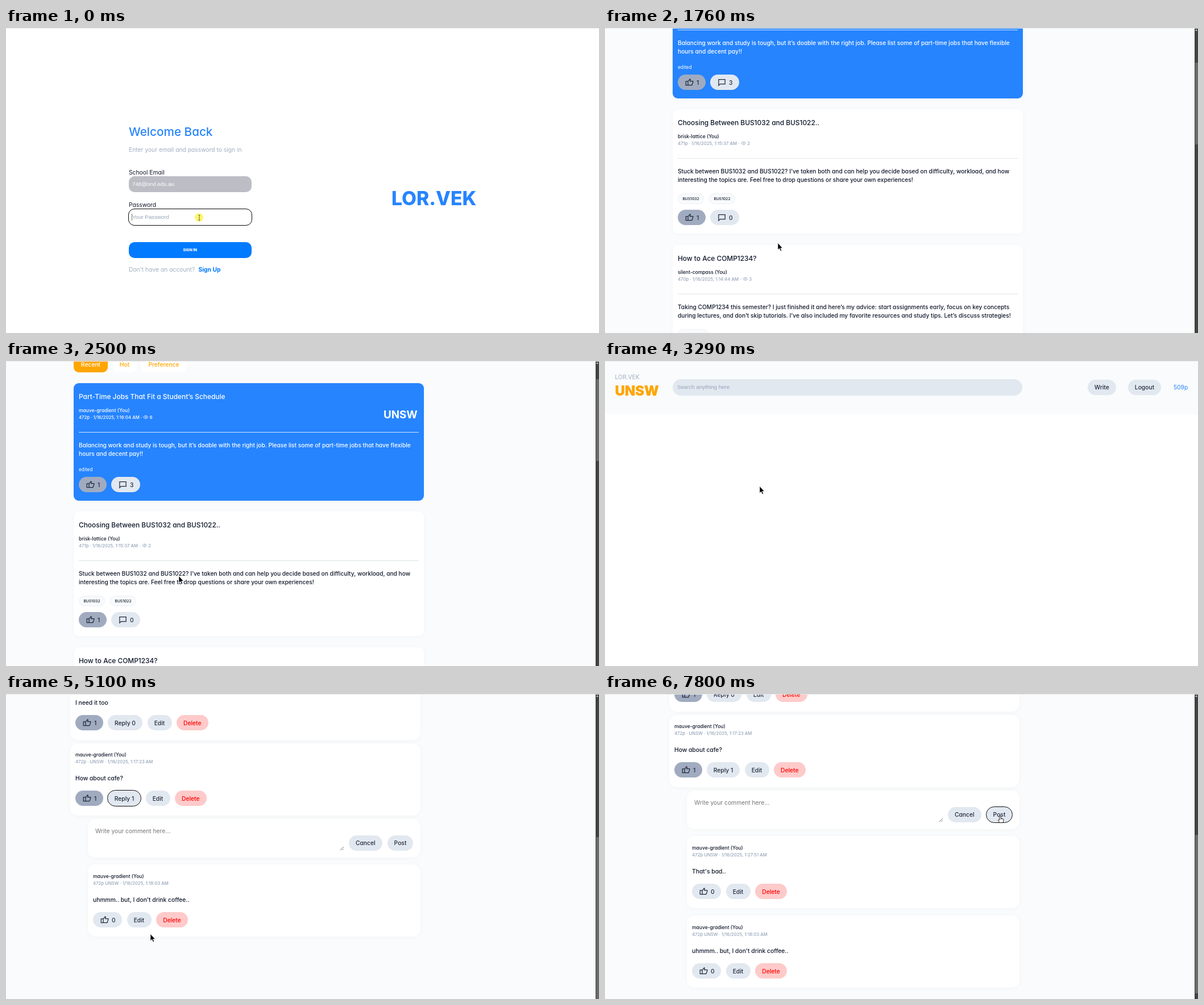
Animation of 1043x537 px, one loop 7.86 s. Source, as an HTML page:

```html
<!DOCTYPE html>
<html lang="en">
<head>
<meta charset="utf-8">
<title>Student forum</title>
<style>
html, body { margin: 0; width: 100%; height: 100%; overflow: hidden; background: #fff; }
#stage { position: relative; width: 1043px; height: 537px; overflow: hidden; background: #fff;
  font: 400 10.3px/16px Inter, "Open Sans", sans-serif; font-feature-settings: "cv11"; color: #0f172a; }
#stage div, #stage span.t, #stage svg.abs { position: absolute; box-sizing: border-box; }
[hidden] { display: none !important; }
.scene { inset: 0; overflow: hidden; background: #fafbfc; }
#login, #blank { background: #fff; }
.scroll { left: 0; top: 0; width: 1037px; }
.t { white-space: pre; }
.m { font-weight: 500; }
.b { font-weight: 700; }
.title { font-size: 11.9px; font-weight: 500; }
.user { font-size: 8.5px; font-weight: 500; }
.meta { font-size: 7.75px; font-weight: 500; color: #94a3b8; }
.note { font-size: 8.3px; color: #94a3b8; }
.para { font-size: 10.2px; font-weight: 500; line-height: 15px; }
.grey { color: #a0aec0; }
.hint { color: #757575; }
.blue { color: #2684ff; }
.link { color: #007aff; }
.input { font: 9.7px/16px "Liberation Sans", Arial, sans-serif; color: #94a3b8; }
.welcome { font-size: 20.7px; font-weight: 500; }
.brand { font-size: 33.6px; font-weight: 800; }
.school { font-size: 24.2px; font-weight: 900; letter-spacing: -.3px; color: #ffa500; }
.badge { font-size: 18.8px; font-weight: 700; }
.top { background: #f9fbfc; }
.email { border-radius: 10px; background: #bdbdc5; }
.email .input { color: #fff; }
.password { border: 1.7px solid #0a0a0a; border-radius: 11px; }
.pill { display: flex; align-items: center; justify-content: center; border-radius: 16px;
  background: #e2e8f0; color: #1e293b; font-weight: 500; white-space: pre; }
.submit { border-radius: 10px; background: #007aff; color: #fff; font-size: 6.6px; font-weight: 800; }
.liked { background: #a0abc0; }
.danger { background: #fecaca; color: #f00; }
.tab { border-radius: 9px; background: #fff; color: #ffa500; }
.tab.on { background: #ffa500; color: #fff; }
.tag { font-size: 6.7px; background: #f8fafc; border: 1px solid #edf1f5; color: #0f172a; }
.ring { outline: 1.4px solid #0c0c0c; }
.card { background: #fff; border-radius: 9px; box-shadow: 0 1px 8px rgba(15, 23, 42, .03); }
.round { border-radius: 14px; }
.rule { background: #dfe4ea; }
.hot { background: #2684ff; color: #fff; }
.hot .meta, .hot .note { color: #fff; }
.hot .rule { background: #d4e6ff; }
svg { fill: none; stroke: currentColor; }
#bar { left: 1037px; top: 0; width: 6px; height: 537px; background: #424242; }
#thumb { left: 1px; width: 5px; background: #6a6a6a; }
#arrowUp { left: 1px; top: 2px; border: 2.5px solid transparent; border-top: 0; border-bottom: 3px solid #c8c8c8; }
#topLine { left: 0; top: 0; width: 1043px; height: 1px; background: #e9eaec; }
#glow { border-radius: 50%; background: #fdf66c; }
#caret { background: #777; }
#cursor { left: 0; top: 0; width: 0; height: 0; }
#cursor svg { position: absolute; overflow: visible; }
</style>
</head>
<body>
<div id="stage">
  <div class="scene" id="login"></div>
  <div class="scene" id="blank"></div>
  <div class="scene" id="feed"></div>
  <div class="scene" id="detail"></div>
  <div id="bar"><div id="thumb"></div><div id="arrowUp"></div></div>
  <div id="topLine"></div>
  <div id="cursor">
    <svg id="beam" width="1" height="1"><path d="M-1.5-4.5H1.5M0-4.5V4.5M-1.5 4.5H1.5" stroke="#555" stroke-width=".9"/></svg>
    <svg id="arrow" width="1" height="1"><path d="M0-.5V11.6L2.7 9.1 4.7 13.6 6.6 12.8 4.6 8.4H8.2Z" fill="#000" stroke="#fff" stroke-width=".6"/></svg>
    <svg id="hand" width="1" height="1"><path d="M-1.2 1Q0-.8 1.2 1V5L5.2 5.8Q6.3 6.2 6 8L5.2 12.6H-.8L-3.6 8.4Q-3.6 6.8-1.2 8Z" fill="#fff" stroke="#111" stroke-width=".9"/><path d="M1.2 5V7M3.2 5.5V7.2" stroke="#111" stroke-width=".6"/></svg>
  </div>
</div>
<script>
const LOOP = 7860, VIEW = 600, TRACK = 584, BRAND = 'LOR.VEK', ME = 'mauve-gradient';
const $ = id => document.getElementById(id);

const shapes = {
  like: 'M8 20V9.5L13.6 3l1.3 1.3L13.7 9H22v3l-3 8zM2 9.5h6V20H2z',
  chat: 'M3 21V4h18v13H7z',
  pencil: 'M4 20v-4L16 4l4 4L8 20z',
  bin: 'M4 6.5h16M9 4h6M6 6.5V21h12V6.5M10 10v8M14 10v8',
  eye: 'M1.5 12C6 3.5 18 3.5 22.5 12 18 20.5 6 20.5 1.5 12zM12 8.5a3.5 3.5 0 1 0 .01 0z'
};
const icon = (name, size, style) =>
  `<svg viewBox="0 0 24 24" width="${size}" height="${size}" stroke-width="2" style="${style}"><path d="${shapes[name]}"/></svg>`;
const box = (x, y, w, h, cls, inner = '', id = '') =>
  `<div ${id && `id="${id}"`} class="${cls}" style="left:${x}px;top:${y}px;width:${w}px;height:${h}px">${inner}</div>`;
// y is the middle of the first line
const text = (x, y, s, cls = '', id = '') =>
  `<span ${id && `id="${id}"`} class="t ${cls}" style="left:${x}px;top:${y - 8}px">${s}</span>`;
const pill = (x, y, w, label, cls = '', h = 27.3, id = '') => box(x, y, w, h, 'pill ' + cls, label, id);
const iconPill = (x, y, w, name, label, cls = '') =>
  pill(x, y, w, icon(name, 15, 'position:absolute;left:12.5px;top:6px') + text(33, 13.5, label), cls);
const grip = (x, y) =>
  `<svg class="abs" style="left:${x}px;top:${y}px" width="6" height="6"><path d="M0 6L6 0M3.5 6L6 3.5" stroke="#555" stroke-width=".8"/></svg>`;

function header(wide) {
  const dy = wide ? 1 : 0;
  const [search, write, logout, points] = wide ? [118.5, 848.5, 920, 1000] : [116.5, 843, 913, 990];
  return text(17.5, 26.5 + dy, BRAND, 'grey') + text(17.5, 52 + dy, 'UNSW', 'school') +
    box(search, 31 + dy, 615.5, 28.5, 'pill', text(8.5, 14.3, 'Search anything here', 'input')) +
    pill(write, 31.5 + dy, 50.5, 'Write') + pill(logout, 31.5 + dy, 58, 'Logout') +
    text(points, 45 + dy, '509p', 'blue');
}

function post(x, y, p) {
  return box(x, y, 615.5, p.buttons + 42, 'card ' + (p.cls || ''),
    text(9, 23.5, p.title, 'title') + text(9, 47.5, p.user + ' (You)', 'user') +
    text(9, 59.5, `${p.meta} · ${icon('eye', 9.5, 'vertical-align:-2px')} ${p.views}`, 'meta') +
    (p.logo ? text(545, 56, 'UNSW', 'badge') : '') +
    box(9, 86, 598, 1, 'rule') +
    text(9, 110, p.body, 'para') +
    (p.tags || []).map((s, i) => box(9 + i * 55, 148, s.length > 7 ? 54 : 46, 19, 'pill tag', s)).join('') +
    (p.edited ? text(9, p.buttons - 13, 'edited', 'note') : '') +
    iconPill(9, p.buttons, 48.5, 'like', 1, 'liked') +
    iconPill(66, p.buttons, 50.5, 'chat', p.chats) + (p.extra || ''));
}

function comment(x, y, w, meta, body, buttons, id = '') {
  return box(x, y, w, 127, 'card round',
    text(9, 20.5, ME + ' (You)', 'user') + text(9, 32.5, meta, 'meta') + text(9, 61.5, body, 'm') + buttons, id);
}
const reply = (y, clock, body, id) => comment(144, y, 585, `472p UNSW · 1/16/2025, ${clock} AM`, body,
  iconPill(9, 84, 51, 'like', 0) + pill(68.5, 84, 43, 'Edit') + pill(120, 84, 56, 'Delete', 'danger'), id);

$('login').innerHTML =
  text(216, 182.5, 'Welcome Back', 'welcome blue') +
  text(216, 214, 'Enter your email and password to sign in', 'grey') +
  text(216, 253.5, 'School Email') +
  box(216, 261, 215.5, 27.5, 'email', text(6, 14, '748@orvl.edu.au', 'input')) +
  text(216, 311, 'Password') +
  box(215, 317.5, 217.5, 30, 'password') +
  box(332, 326, 15, 15, '', '', 'glow') +
  text(222, 332.5, 'Your Password', 'input', 'placeholder') + text(223, 332.5, '', 'input', 'dots') +
  box(221, 326.5, 1, 12, '', '', 'caret') +
  pill(216, 377, 215.5, 'SIGN IN', 'submit', 28) +
  text(216, 424.5, 'Don\'t have an account?', 'grey') + text(338.5, 424.5, 'Sign Up', 'b link') +
  text(678, 300, BRAND, 'brand blue');

$('blank').innerHTML = box(0, 0, 1043, 93.5, 'top') + header(true);

const jobs = {
  title: 'Part-Time Jobs That Fit a Student’s Schedule', user: ME,
  meta: '472p · 1/16/2025, 1:16:04 AM', views: 6, chats: 3, buttons: 165, edited: true,
  body: 'Balancing work and study is tough, but it’s doable with the right job. Please list some of part-time jobs that have flexible\nhours and decent pay!!'
};
$('feed').innerHTML = '<div class="scroll" id="feedBody">' + header() +
  pill(119, 92.5, 60, 'Recent', 'tab on') + pill(187.5, 92.5, 42, 'Hot', 'tab') + pill(238, 92.5, 79, 'Preference', 'tab') +
  post(119, 139, { ...jobs, cls: 'hot', logo: true }) +
  post(119, 365, {
    title: 'Choosing Between BUS1032 and BUS1022..', user: 'brisk-lattice', meta: '471p · 1/16/2025, 1:15:37 AM',
    views: 2, chats: 0, buttons: 177, tags: ['BUS1032', 'BUS1022'],
    body: 'Stuck between BUS1032 and BUS1022? I’ve taken both and can help you decide based on difficulty, workload, and how\ninteresting the topics are. Feel free to drop questions or share your own experiences!'
  }) +
  post(119, 604, {
    title: 'How to Ace COMP1234?', user: 'silent-compass', meta: '470p · 1/16/2025, 1:14:44 AM',
    views: 3, chats: 0, buttons: 194, tags: ['COMP1234'], edited: true,
    body: 'Taking COMP1234 this semester? I just finished it and here’s my advice: start assignments early, focus on key concepts\nduring lectures, and don’t skip tutorials. I’ve also included my favorite resources and study tips. Let’s discuss strategies!'
  }) +
  post(119, 860, {
    title: 'Dealing with Burnout: My Experience and Tips', user: 'hollow-trapezoid', meta: '469p · 1/16/2025, 1:13:38 AM',
    views: 1, chats: 0, buttons: 165, body: ''
  }) + '</div>';

const ownButtons = (n, w, id) => iconPill(9, 83.5, 48.5, 'like', 1, 'liked') +
  pill(66, 83.5, w, 'Reply ' + n, '', 27.3, id) + pill(74.5 + w, 83.5, 43, 'Edit') + pill(126 + w, 83.5, 55.5, 'Delete', 'danger');
$('detail').innerHTML = '<div class="scroll" id="detailBody">' + header() +
  post(113, 94, {
    ...jobs,
    extra: iconPill(458, 165, 63.5, 'pencil', 'edit') + iconPill(530, 165, 76.5, 'bin', 'delete', 'danger')
  }) +
  box(113, 326, 616, 69, 'card round', text(13.5, 21.5, 'What do you think?', 'hint') + grip(512, 50) + pill(543, 25.5, 60, 'Submit', '', 31)) +
  comment(113, 419.5, 616, '472p · UNSW · 1/16/2025, 1:17:38 AM', 'I need it too', ownButtons(0, 61, 'reply0')) +
  comment(113, 552.5, 616, '472p · UNSW · 1/16/2025, 1:17:23 AM', 'How about cafe?', ownButtons(1, 58, 'reply1')) +
  '<div id="thread" style="left:0;top:0">' +
  box(144, 686, 585, 67.5, 'card round', text(13, 20.5, '', 'hint', 'draft') + grip(444, 49) +
    pill(458.5, 28.5, 59.5, 'Cancel') + pill(527, 28.5, 45, 'Post', '', 27.3, 'postBtn')) +
  reply(766, '1:27:51', 'That\'s bad..', 'fresh') + reply(766, '1:18:03', 'uhmmm.. but, I don\'t drink coffee..', 'older') +
  '</div></div>';

// Each key is [time, ...values], joined by straight lines.
const feedScroll = [[1450, 0], [1940, 350], [2120, 395], [2329, 395], [2330, 260], [2499, 260], [2500, 100], [2699, 100], [2700, 0]];
const detailScroll = [[3450, 0], [3870, 150], [3910, 158], [4250, 290], [4880, 290], [5100, 466], [5350, 516]];
const path = [[560, 340, 334], [1060, 304, 379], [2909, 304, 379], [2910, 280, 281], [3110, 280, 281],
  [3290, 272, 221], [3400, 272, 221], [3910, 283, 256], [4300, 275, 262], [4640, 212, 361], [4760, 212, 361],
  [4910, 254, 423], [5400, 254, 423], [5690, 230, 339], [5900, 165, 191], [6080, 165, 191],
  [6500, 694, 180], [7320, 711, 182], [7450, 695, 214]];

function at(keys, t) {
  let i = keys.findIndex(k => k[0] > t);
  if (i < 0) i = keys.length;
  const a = keys[Math.max(i - 1, 0)], b = keys[Math.min(i, keys.length - 1)];
  const f = b[0] > a[0] ? (t - a[0]) / (b[0] - a[0]) : 0;
  return a.slice(1).map((v, n) => v + (b[n + 1] - v) * f);
}

const message = 'That\'s bad..';
const typed = t => t < 6500 ? Math.min(8, Math.floor((t - 6020) / 60)) : Math.min(12, 8 + Math.floor((t - 6460) / 160));
const show = (id, on) => { $(id).hidden = !on; };

function draw(t) {
  const scene = t < 1190 ? 'login' : t < 1250 ? 'blank' : t < 3110 ? 'feed' : t < 3330 ? 'blank' : 'detail';
  for (const id of ['login', 'blank', 'feed', 'detail']) show(id, id === scene);

  const dots = t < 130 ? 0 : t < 300 ? 1 : t < 430 ? 2 : 3;
  for (const id of ['placeholder', 'glow', 'caret']) show(id, !dots);
  $('dots').textContent = '•'.repeat(dots);

  const open = t >= 4700, posted = t >= 7700, inFeed = scene === 'feed';
  const [scroll] = at(inFeed ? feedScroll : detailScroll, t);
  $(inFeed ? 'feedBody' : 'detailBody').style.transform = `translateY(${-Math.round(scroll)}px)`;
  const height = inFeed ? 2433 : posted ? 1256 : open ? 1116 : 890;
  show('bar', inFeed || scene === 'detail');
  $('thumb').style.top = 8 + scroll * TRACK / height + 'px';
  $('thumb').style.height = VIEW * TRACK / height + 'px';

  show('thread', open);
  show('fresh', posted);
  $('older').style.top = (posted ? 906 : 766) + 'px';
  const n = posted ? 0 : typed(t);
  $('draft').textContent = n > 0 ? message.slice(0, n) : 'Write your comment here...';
  $('draft').style.color = n > 0 ? '#0f172a' : '';
  $('reply1').classList.toggle('ring', open && t < 5950);
  $('postBtn').classList.toggle('ring', t >= 7510);

  const [x, y] = at(path, t);
  const kind = t < 720 || (t > 5840 && t < 6400 && x < 594) ? 'beam'
    : (t > 960 && t < 1190) || (t > 4600 && t < 4780) || t > 7420 ? 'hand' : 'arrow';
  for (const id of ['beam', 'arrow', 'hand']) $(id).style.display = id === kind ? 'block' : 'none';
  $('cursor').style.transform = `translate(${x}px,${y}px)`;
}

const start = performance.now();
function tick() {
  draw((performance.now() - start) % LOOP);
  requestAnimationFrame(tick);
}
tick();
</script>
</body>
</html>
```
